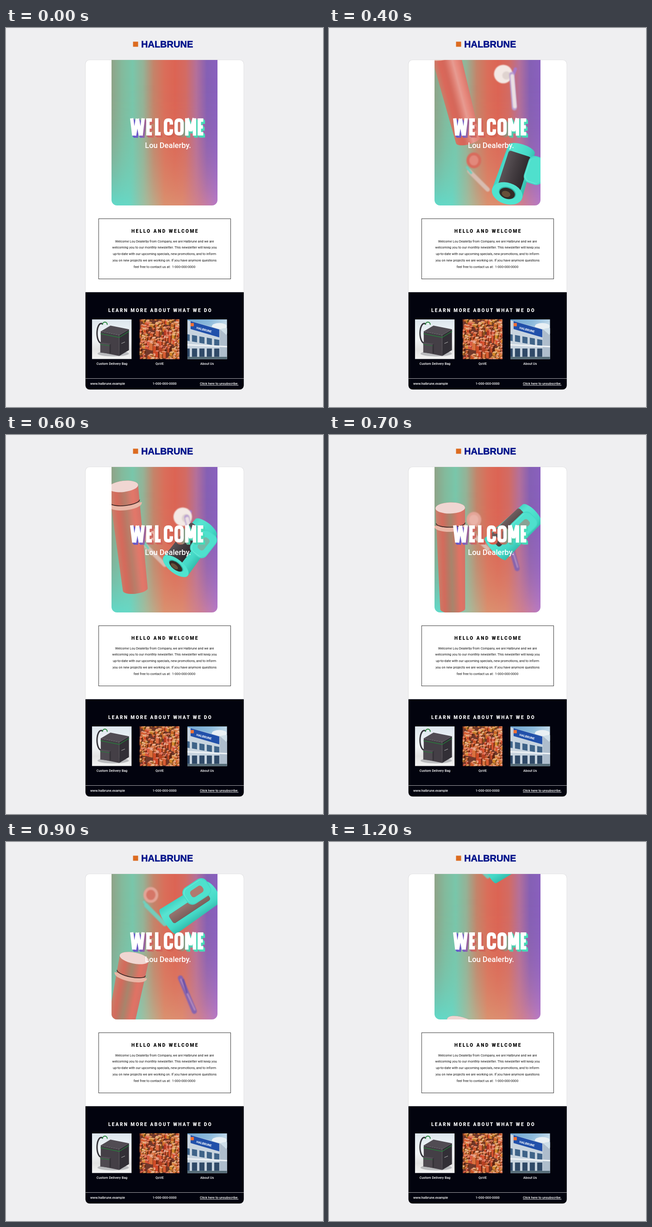
Recreate the animation shown at these times as an HTML page with a canvas. Size 685 by 818 pixels, loop 1300 ms.

```html
<!DOCTYPE html>
<html lang="en">
<head>
<meta charset="utf-8">
<title>Newsletter</title>
<style>
  html, body { margin: 0; width: 100%; height: 100%; overflow: hidden; background: #efeff1; }
  canvas, svg { position: absolute; left: 0; top: 0; width: 685px; height: 818px; }
  text { font-family: Roboto, "Liberation Sans", sans-serif; font-weight: 500; font-size: 7.2px; white-space: pre; }
  .mid { text-anchor: middle; }
  .copy text { font-weight: 400; }
  .head { font-size: 10px; font-weight: 800; }
  .light { fill: #fff; }
  .brand { font: bold 20px "Liberation Sans", Arial, sans-serif; fill: #00128a; stroke: #00128a; stroke-width: .5; }
  .name { font-size: 16.5px; fill: #fff; }
  .sign { font-size: 6.6px; font-weight: 700; }
</style>
</head>
<body>
<canvas id="page" width="685" height="818"></canvas>
<canvas id="hero" width="685" height="818" role="img" aria-label="WELCOME"></canvas>
<svg viewBox="0 0 685 818">
  <text class="brand" x="292" y="42">HALBRUNE</text>
  <text class="name mid" x="350" y="259.3">Lou Dealerby.</text>
  <text class="head" x="271" y="441.6" letter-spacing="2.55">HELLO AND WELCOME</text>
  <g class="mid copy" fill="#111">
    <text x="342.5" y="462.7">Welcome Lou Dealerby from Company, we are Halbrune and we are</text>
    <text x="342.5" y="476.4">welcoming you to our monthly newsletter. This newsletter will keep you</text>
    <text x="342.5" y="490.1">up-to-date with our upcoming specials, new promotions, and to inform</text>
    <text x="342.5" y="503.8">you on new projects we are working on. If you have anymore questions</text>
    <text x="342.5" y="517.5">feel free to contact us at:  1-000-000-0000</text>
  </g>
  <g class="light">
    <text class="head" x="221" y="612.7" letter-spacing="2.4">LEARN MORE ABOUT WHAT WE DO</text>
    <text class="mid" x="229" y="726.5">Custom Delivery Bag</text>
    <text class="mid" x="332" y="726.5">QoVE</text>
    <text class="mid" x="434.5" y="726.5">About Us</text>
    <text x="182" y="770.2">www.halbrune.example</text>
    <text class="mid" x="342.7" y="770.2">1-000-000-0000</text>
    <text x="419" y="770.2" text-decoration="underline">Click here to unsubscribe.</text>
    <text class="sign" transform="translate(411 649) rotate(15)">HALBRUNE</text>
  </g>
</svg>
<script>
const W = 685, H = 818, STEP = 100, STEPS = 13;
const page = document.getElementById('page').getContext('2d');
const hero = document.getElementById('hero').getContext('2d');
const X = 228, Y = 69, BW = 229, BH = 314;
const { PI, tanh, sin, min, max } = Math;
const clamp = v => max(0, min(1, v));

function rect(c, fill, x, y, w, h) {
  c.fillStyle = fill;
  c.fillRect(x, y, w, h);
}
function round(c, fill, x, y, w, h, r) {
  c.fillStyle = fill;
  c.beginPath();
  c.roundRect(x, y, w, h, r);
  c.fill();
}
function oval(c, fill, x, y, rx, ry) {
  c.fillStyle = fill;
  c.beginPath();
  c.ellipse(x, y, rx, ry, 0, 0, 2 * PI);
  c.fill();
}
function arc(c, color, width, x, y, rx, ry, from, to, back) {
  c.strokeStyle = color;
  c.lineWidth = width;
  c.beginPath();
  c.ellipse(x, y, rx, ry, 0, from, to, back);
  c.stroke();
}
function line(c, color, width, x1, y1, x2, y2) {
  c.strokeStyle = color;
  c.lineWidth = width;
  c.lineCap = 'round';
  c.beginPath();
  c.moveTo(x1, y1);
  c.lineTo(x2, y2);
  c.stroke();
}
// Upright parallelogram: w wide, h high, its right side shifted down by drop.
function slant(c, fill, x, y, w, h, drop) {
  c.fillStyle = fill;
  c.beginPath();
  c.moveTo(x, y);
  c.lineTo(x + w, y + drop);
  c.lineTo(x + w, y + drop + h);
  c.lineTo(x, y + h);
  c.fill();
}
// Box seen from above; x, y is its nearest bottom corner.
function prism(c, x, y, left, right, h, rise, [top, front, side]) {
  const up = left * rise, far = right * rise * 3;
  slant(c, front, x - left, y - h - up, left, h, up);
  slant(c, side, x, y - h, right, h, -far);
  c.fillStyle = top;
  c.beginPath();
  c.moveTo(x, y - h);
  c.lineTo(x + right, y - h - far);
  c.lineTo(x + right - left, y - h - far - up);
  c.lineTo(x - left, y - h - up);
  c.fill();
}
function ramp(c, x1, y1, x2, y2, ...colors) {
  const g = c.createLinearGradient(x1, y1, x2, y2);
  colors.forEach((color, i) => g.addColorStop(i / (colors.length - 1), color));
  return g;
}

// ---- static page ----
function drawBag(c) {
  const green = '#25833a';
  rect(c, ramp(c, 0, 0, 0, 86, '#dde6ed', '#e9eff3', '#f1f4f6', '#e3e3e3', '#f3f3f3'), 0, 0, 86, 86);
  oval(c, '#b9babd', 46, 74, 34, 6);
  arc(c, '#35343a', 3, 20, 30, 9, 21, PI / 2, PI * 1.6);
  prism(c, 59, 79, 40, 21, 45, .2, ['#514c53', '#443f46', '#322f36']);
  prism(c, 38, 74, 20, 3, 20, .12, ['#5a555c', '#4f4a51', '#353238']);
  line(c, green, 1.3, 19, 31, 59, 39);
  line(c, green, 1.3, 59, 39, 80, 26);
  line(c, green, 1, 18, 54, 38, 57);
  arc(c, green, 2, 28, 11, 5, 5, PI, 2 * PI);
  line(c, '#bbb', 1, 64, 52, 71, 49);
}
function drawCity(c) {
  rect(c, '#70372a', 0, 0, 86, 86);
  let seed = 17;
  const rnd = () => (seed = seed * 16807 % 2147483647) / 2147483647;
  for (let i = 0; i < 300; i++) {
    const x = rnd() * 96, y = i / 300 * 96;
    const near = Math.hypot(x - 46, y - 62) < 26;
    const hue = near ? 8 + rnd() * 14 : 10 + rnd() * 24, lit = 40 + rnd() * 18;
    const tone = d => `hsl(${hue} 68% ${lit + d}%)`;
    prism(c, x, y, 3 + rnd() * 4, 2 + rnd() * 2, 2 + rnd() * (near ? 16 : 6), .25, [tone(18), tone(0), tone(-22)]);
  }
}
function drawBuilding(c) {
  rect(c, ramp(c, 0, 0, 70, 50, '#6da4d0', '#8dbbdc', '#d8e6ef'), 0, 0, 86, 86);
  oval(c, '#e9f0f4', 69, 15, 16, 7);
  oval(c, '#cfdfe9', 82, 25, 13, 6);
  slant(c, '#c8d4df', 0, 2, 70, 100, 19);
  slant(c, '#aebdcc', 70, 21, 16, 80, 14);
  slant(c, '#2150aa', 7, 4, 62, 17, 18);
  rect(c, '#ef7034', 7, 8, 7, 7);
  for (let x = -6; x < 70; x += 16) {
    slant(c, '#3f6388', x, 32 + x * .18, 11, 14, 2);
    slant(c, '#304a68', x, 63, 11, 18, 0);
  }
  line(c, '#eef2f5', 3, 0, 55, 86, 59);
  rect(c, '#536a75', 0, 81, 86, 5);
}
function drawPage(c) {
  rect(c, '#efeff1', 0, 0, W, H);
  rect(c, '#dc6b20', 274.5, 29.5, 11, 11);
  round(c, '#dcdcde', 171.2, 68.6, 343, 712, 9);
  round(c, '#fff', 172, 69.3, 341.5, 710.5, 8.5);
  round(c, '#02030e', 171.7, 570.3, 342.1, 210, [0, 0, 9, 9]);
  rect(c, '#a5a5aa', 172, 756, 342, 1);
  c.strokeStyle = '#222';
  c.lineWidth = .9;
  c.strokeRect(200.2, 411.7, 285.2, 129.9);
  [drawBag, drawCity, drawBuilding].forEach((draw, i) => {
    c.save();
    c.translate(185.7 + i * 103.1, 628.8);
    c.beginPath();
    c.rect(0, 0, 85.7, 85.7);
    c.clip();
    draw(c);
    c.restore();
  });
}

// ---- hero backdrop ----
function layer(draw) {
  const cv = document.createElement('canvas');
  cv.width = W;
  cv.height = H;
  draw(cv.getContext('2d'));
  return cv;
}
const floor = layer(c => {
  rect(c, ramp(c, X, 0, X + BW, 0, '#5fd9c8', '#68d7c4', '#a8b99a', '#da916f', '#dd8b70', '#cd7f92', '#b679c8'), X, Y, BW, BH);
  const fade = Array.from({ length: 11 }, (_, i) => `rgba(0,0,0,${(i / 10) ** 3})`);
  c.globalCompositeOperation = 'destination-in';
  rect(c, ramp(c, 0, Y, 0, Y + BH, ...fade), X, Y, BW, BH);
});
const backdrop = layer(c => {
  rect(c, ramp(c, X, 0, X + BW, 0, '#8fa388', '#83ba9c', '#79c6aa', '#95b296', '#c58369', '#da6e5a',
    '#dc6454', '#d36b63', '#b4709a', '#8560b4', '#8960be'), X, Y, BW, BH);
  c.drawImage(floor, 0, 0);
});

// ---- moving objects: each pose is a function of the step k ----
function place(c, x, y, deg, draw) {
  c.save();
  c.translate(x, y);
  c.rotate(deg * PI / 180);
  draw();
  c.restore();
}

function drawBottle(c, k) {
  const x = 262 + 26 * tanh((k - 7) / 3), y = 46.5 * k - 168;
  const lean = max(-16, 21 - .4 * k * k), len = 226 - 8 * tanh(k - 6);
  const body = (...colors) => {
    c.fillStyle = ramp(c, -31, 0, 31, 0, ...colors);
    c.beginPath();
    c.moveTo(-32, 0);
    c.ellipse(0, len - 2, 27, 9, 0, PI, 0, true);
    c.ellipse(0, 0, 32, 12, 0, 0, PI, true);
    c.fill();
  };
  place(c, x, y, -lean, () => {
    body('#c5826d', '#da685a', '#d46659', '#df6c5f', '#e87063', '#d27267');
    c.globalAlpha = clamp((6.5 - k) / 4.5);
    body('#e0908200', '#e0908200', '#eac0b9', '#e0908266');
    c.globalAlpha = clamp((k - 4) / 3);
    body('#91917300', '#91917320', '#919173b0', '#91917320', '#91917300');
    c.globalAlpha = 1;
    c.lineCap = 'butt';
    arc(c, '#e9b6a6', 9, 0, 38, 31.3, 9, PI, 0, true);
    arc(c, '#3a2524', 1.6, 0, 32.5, 31.3, 9, PI, 0, true);
    oval(c, '#f0d6d2', 0, 0, 32, 12);
  });
}

function drawSpeaker(c, k) {
  const swing = tanh((k - 5) / 3.3), roll = clamp((k - 4) / 5);
  const face = 15 - 8 * tanh(2 * k - 12), r = 34 - 2 * roll, len = 100 + 14 * roll;
  const mid = -14 * sin(PI * roll), half = 25 - 14 * roll;
  place(c, 376 - 31 * swing, 505 - 37 * k, -62 + 34 * swing, () => {
    c.fillStyle = ramp(c, 0, -r, 0, r, '#3fd2c1', '#58e4d1', '#4ee0cd', '#44d8c6', '#34bcad');
    c.beginPath();
    c.ellipse(0, 0, face, r, 0, PI / 2, PI * 1.5);
    c.ellipse(len, 0, 11, r - 4, 0, -PI / 2, PI / 2);
    c.fill();
    const panel = (...colors) => round(c, ramp(c, 0, mid - half, 0, mid + half, ...colors), 8, mid - half, len - 18, half * 2, 5);
    panel('#5a5357', '#433c40', '#2e292d');
    c.globalAlpha = clamp((k - 6) / 3) * .65;
    panel('#b58a80', '#a87c74');
    c.globalAlpha = 1;
    if (face > 12) {
      oval(c, '#4fe3cf', 0, 0, face, r);
      oval(c, '#2fb3a5', 1, 0, face * .56, r * .56);
      oval(c, '#342b27', 0, 0, face * .5, r * .5);
      oval(c, '#665039', -2, -2, face * .28, r * .28);
    }
    const u = 66 + 22 * roll, v = 43 - 63 * roll;
    round(c, '#46d9c7', u - 30, v - 21, 60, 42, 14);
    round(c, '#62e8d6', u - 28, v - 19, 54, 36, 12);
    round(c, '#4fe0cd', u - 26, v - 17, 54, 36, 12);
    c.globalAlpha = roll;
    round(c, '#b07a70', u - 15, v - 8, 30, 16, 6);
  });
}

function drawDisc(c, k) {
  const x = 313, y = 423 - 34.3 * k, late = k > 7;
  c.filter = 'blur(1px)';
  line(c, late ? '#72cdbb' : '#d8bcb0', 9, x - 10, y + 23, x + 30, y + 63);
  line(c, '#6fd0bd', 5, x - 15, y + 15, x - 6, y + 27);
  oval(c, k < 4 ? '#cf7b98' : k < 5 ? '#d86c5d' : '#e3a497', x, y, 16, 17);
  oval(c, late ? '#d57667' : 'rgba(255,225,220,.25)', x, y, 10, 11);
  c.filter = 'none';
}

function drawPen(c, k) {
  const x = 395 + 12 * tanh((k - 3) / 2), y = 18 + 38.6 * k;
  const tx = x + 14 - 4.9 * k, ty = y - 72, late = k > 6;
  c.filter = 'blur(.8px)';
  if (!late) {
    line(c, '#a878c8', 7, tx, ty + 8, tx + 8, ty - 12);
    oval(c, '#f3e9e5', x - 24, y - 73, 20, 20);
    oval(c, '#dfd3cf', x - 17, y - 70, 9, 9);
  }
  line(c, late ? '#8763ae' : '#b9a0d2', 11, tx, ty, x, y);
  line(c, late ? '#b58fc0' : '#eadfe3', late ? 3 : 8, tx + 1, ty + 3, x + 1, y - 3);
  if (late) line(c, '#6a50a8', 4, tx + 6, ty + 4, tx + 14, ty + 32);
  c.filter = 'none';
}

// ---- lettering: centre lines in a unit box ----
const GLYPHS = {
  W: 'M0 -.13L.18 1.13M.5 -.1L.24 1.13M.5 -.1L.76 1.13M1 -.13L.82 1.13',
  E: 'M1 0H0V1H1M0 .5H.9',
  L: 'M0 -.13V1H1',
  C: 'M1 .33V.2Q1 0 .5 0T0 .2V.8Q0 1 .5 1T1 .8V.67',
  O: 'M0 .2Q0 0 .5 0T1 .2V.8Q1 1 .5 1T0 .8Z',
  M: 'M0 1.13V-.13M1 1.13V-.13M.04 -.13L.5 .8L.96 -.13'
};
const WIDTHS = { W: 32, E: 16, L: 16, C: 20, O: 20, M: 24 };
const PEN_W = 7.4;
const word = new Path2D();
let left = 268;
for (const ch of 'WELCOME') {
  const w = WIDTHS[ch];
  word.addPath(new Path2D(GLYPHS[ch]), new DOMMatrix([w - PEN_W, 0, 0, 37 - PEN_W, left + PEN_W / 2, 195 + PEN_W / 2]));
  left += w + 3;
}
const shade = ramp(hero, 268, 0, 436, 0, '#5b55cf', '#7760c4', '#cf6a62', '#d4655a', '#d8604f', '#c26e60', '#4ccdae', '#47d8b5', '#43e0bd');

function drawWord(c) {
  c.lineWidth = PEN_W;
  c.lineCap = 'butt';
  c.miterLimit = 2;
  for (let i = 5; i >= 0; i--) {
    c.strokeStyle = i ? shade : '#fff';
    place(c, i * .75, i * .9, 0, () => c.stroke(word));
  }
}

function drawHero(k) {
  const c = hero;
  c.clearRect(0, 0, W, H);
  c.save();
  c.beginPath();
  c.roundRect(X, Y, BW, BH, [0, 0, 12, 12]);
  c.clip();
  c.drawImage(backdrop, 0, 0);
  if (k > 0) [drawPen, drawDisc, drawSpeaker, drawBottle].forEach(draw => draw(c, k));
  drawWord(c);
  c.restore();
}

drawPage(page);
drawHero(0);
let shown = 0;
const start = performance.now();
function tick() {
  const k = Math.floor(max(0, performance.now() - start) / STEP) % STEPS;
  if (k !== shown) drawHero(shown = k);
  requestAnimationFrame(tick);
}
requestAnimationFrame(tick);
</script>
</body>
</html>
```
